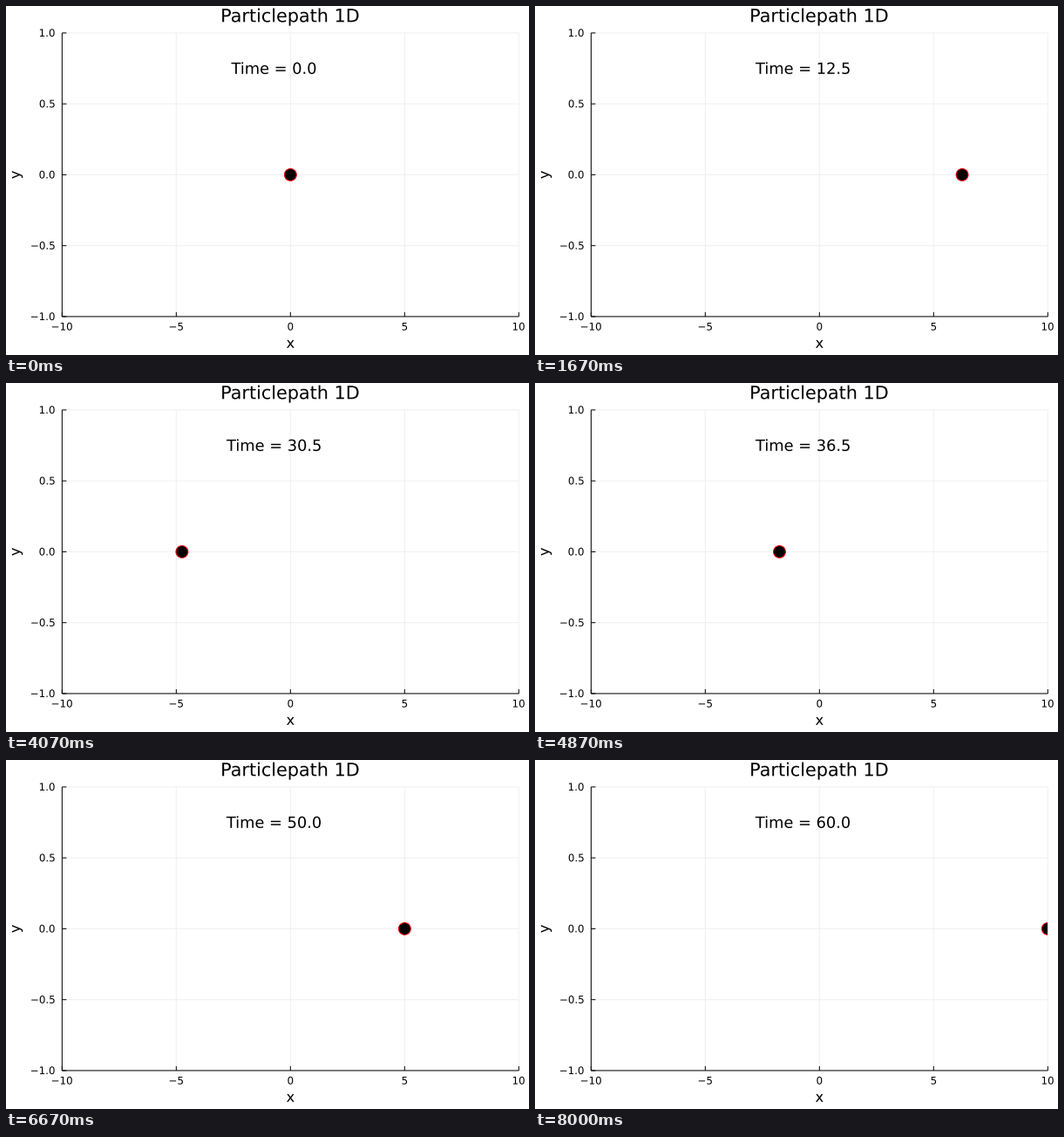
Write a matplotlib script that moves like this. It is 600x400 px and loops after 8.07 s.

```python
import matplotlib.pyplot as plt
from matplotlib.animation import FuncAnimation
from matplotlib.patches import Circle, PathPatch, Rectangle
from matplotlib.textpath import TextPath
from matplotlib.transforms import Affine2D

W, H, DPI = 600, 400, 100
TICK_MS, LOOP_MS = 30, 8070
STEPS_PER_S = 15
LEFT, RIGHT, TOP, BOTTOM = 64.35, 588.3, 30.9, 355.95
PX = 72 / DPI  # one pixel in points
EM = 1.482  # pixels per nominal text size
TICK = 5
SPEED, DT = 0.5, 0.5

fig = plt.figure(figsize=(W / DPI, H / DPI), dpi=DPI, facecolor="white")
ax = fig.add_axes([0, 0, 1, 1])
ax.set_xlim(0, W)
ax.set_ylim(H, 0)
ax.axis("off")


def px_x(x):
    return LEFT + (x + 10) / 20 * (RIGHT - LEFT)


def px_y(y):
    return TOP + (1 - y) / 2 * (BOTTOM - TOP)


def text_path(s, size, x, base, ha="center", angle=0):
    """Outline of s, aligned by its ink horizontally and its baseline vertically."""
    path = TextPath((0, 0), s, size=size * EM, prop={"family": "DejaVu Sans"})
    box = path.get_extents()
    anchor = box.x1 if ha == "right" else (box.x0 + box.x1) / 2
    move = Affine2D().translate(-anchor, 0).scale(1, -1).rotate_deg(-angle)
    return move.translate(x, base).transform_path(path)


def label(*args, **kw):
    patch = PathPatch(text_path(*args, **kw), fc="black", lw=0, zorder=4)
    return ax.add_patch(patch)


def clock_path(t):
    return text_path(f"Time = {t:.1f}", 12, 306.9, 77.8)


def line(x0, y0, x1, y1, color="black", z=2):
    ax.plot([x0, x1], [y0, y1], color=color, lw=PX, zorder=z,
            solid_capstyle="butt", snap=False)


for v in (-10, -5, 0, 5, 10):
    x = px_x(v)
    line(x, TOP, x, BOTTOM, "0.94", 1)
    line(x, BOTTOM, x, BOTTOM - TICK)
    label(str(v).replace("-", "\u2212"), 8, x, 371.6)

for v in (-1, -0.5, 0, 0.5, 1):
    y = px_y(v)
    line(LEFT, y, RIGHT, y, "0.94", 1)
    line(LEFT, y, LEFT + TICK, y)
    label(f"{v:.1f}".replace("-", "\u2212"), 8, 55.7, y + 4.1, ha="right")

line(LEFT, TOP, LEFT, BOTTOM)
line(LEFT, BOTTOM, RIGHT, BOTTOM)

label("Particlepath 1D", 14, px_x(0), 18.3)
label("x", 11, px_x(0), 391.8)
label("y", 11, 15.8, px_y(0), angle=90)

clock = ax.add_patch(PathPatch(clock_path(0), fc="black", lw=0, zorder=4))
ball = ax.add_patch(Circle((px_x(0), px_y(0)), 6.95, fc="black", ec="red",
                           lw=PX, zorder=3))
frame = Rectangle((LEFT, TOP), RIGHT - LEFT, BOTTOM - TOP,
                  transform=ax.transData)
ball.set_clip_path(frame)


def update(i):
    # steps start on the nearest 10 ms
    ms = i * TICK_MS + 20
    t = (ms + 5) * STEPS_PER_S // 1000 * DT
    x = SPEED * t
    while x > 10:  # leaves on the right, comes back on the left
        x -= 20
    ball.center = px_x(x), px_y(0)
    clock.set_path(clock_path(t))
    return ball, clock


anim = FuncAnimation(fig, update, frames=LOOP_MS // TICK_MS, interval=TICK_MS,
                     repeat=True, repeat_delay=0, blit=False)
plt.show()
```
